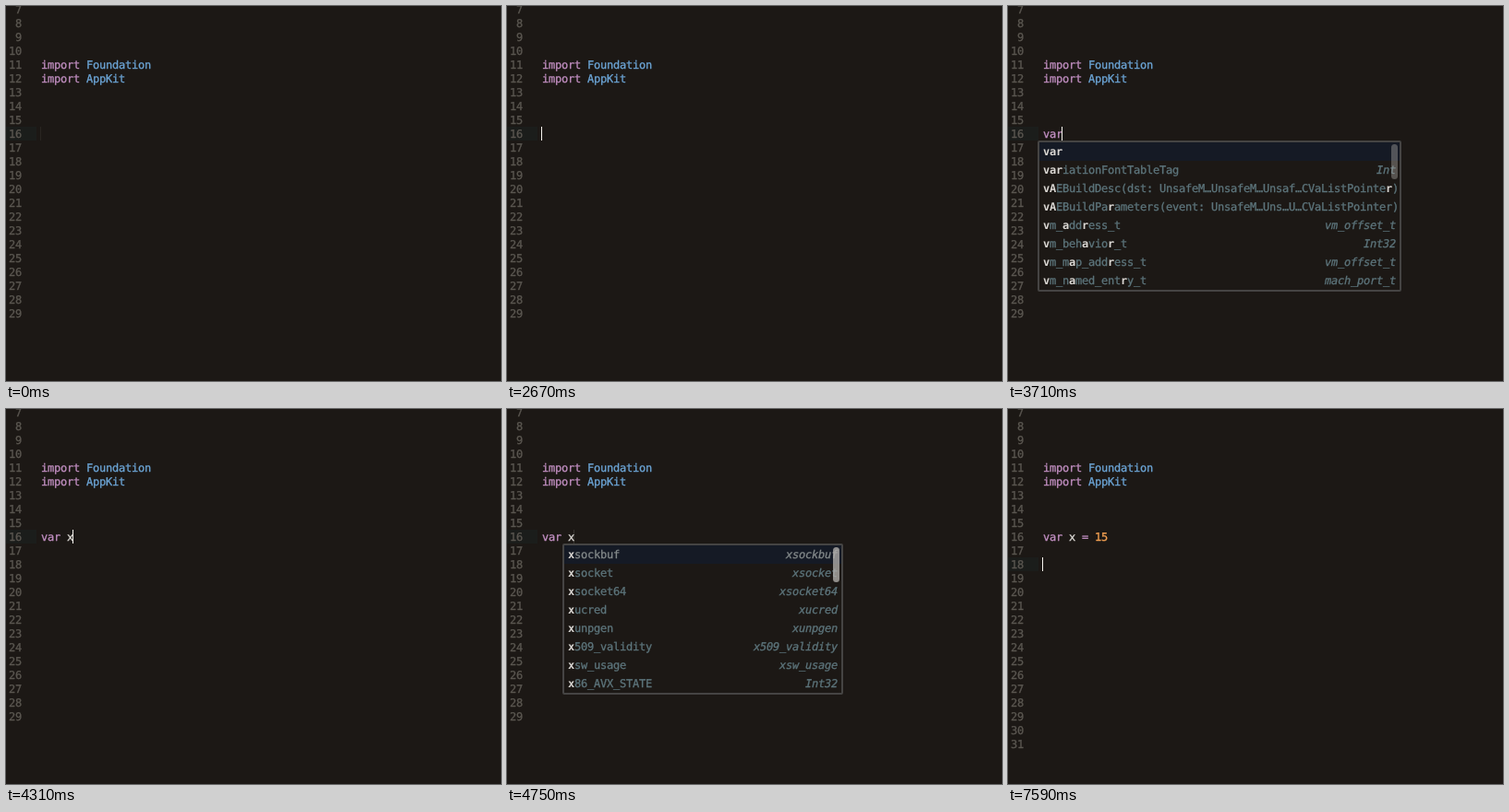
An HTML page that plays this animation: 536 by 407 pixels, repeating every 8 s.

```html
<!DOCTYPE html>
<html lang="en">
<head>
<meta charset="utf-8">
<title>Code completion</title>
<style>
  html, body { margin: 0; width: 100%; height: 100%; overflow: hidden; background: #1c1815; }
  #stage {
    position: relative; width: 536px; height: 407px; overflow: hidden; background: #1c1815;
    font: 12px/15px "DejaVu Sans Mono", monospace; letter-spacing: -.225px;
    text-rendering: geometricPrecision; -webkit-text-stroke: .3px;
    white-space: pre; color: #dedbd7;
  }
  #stage > div { position: absolute; }
  .num { left: 0; width: 17px; text-align: right; color: #5b5751; }
  .code { left: 38px; }
  #active { left: 0; width: 33px; height: 15px; background: #1b1d1b; }
  #caret { width: 1px; height: 15px; background: #f6f3ee; }
  .kw { color: #c28fc2; }
  .mod { color: #6ca5d6; }
  .lit { color: #f3a052; }
  .popup {
    top: 146px; height: 160px; border: 2px solid #454443; border-radius: 2px;
    background: #1c1815; color: #5d757c; overflow: hidden;
  }
  .row { position: relative; height: 20px; line-height: 20px; padding-left: 4px; }
  .row:first-child { background: #151a25; color: #83898a; }
  .row b { color: #dad7d3; -webkit-text-stroke: 0; }
  .row i { position: absolute; right: 4px; top: 0; }
  .bar {
    position: absolute; right: 2px; top: 2px; width: 7px; height: 38px;
    border-radius: 4px; background: rgba(178, 176, 172, .78);
  }
</style>
</head>
<body>
<div id="stage"></div>
<script>
const LOOP = 8000, CELL = 7, LINE = 15, LEFT = 38;
const stage = document.getElementById('stage');
const lineTop = n => 131 + (n - 16) * LINE;
const textTop = n => lineTop(n) + 1;
const span = (cls, text) => `<span class="${cls}">${text}</span>`;
const escape = s => s.replace(/&/g, '&amp;').replace(/</g, '&lt;');

function add(cls, html = '', top) {
  const el = document.createElement('div');
  el.className = cls;
  el.innerHTML = html;
  if (top !== undefined) el.style.top = top + 'px';
  return stage.appendChild(el);
}

function addId(id) {
  const el = add('');
  el.id = id;
  return el;
}

// Bold the letters of the query, in order, wherever they first occur.
function mark(name, query) {
  let k = 0;
  return [...name].map(c => {
    const hit = k < query.length && c.toLowerCase() === query[k];
    if (hit) k++;
    return hit ? `<b>${c}</b>` : escape(c);
  }).join('');
}

function makePopup(left, width, query, items) {
  const rows = items.map(item => {
    const [name, type = ''] = item.split('|');
    return `<div class="row">${mark(name, query)}<i>${escape(type)}</i></div>`;
  });
  const el = add('popup', rows.join('') + '<div class="bar"></div>');
  el.style.left = left + 'px';
  el.style.width = width - 4 + 'px';
  return el;
}

const active = addId('active');
const nums = [];
for (let n = 7; n <= 31; n++) nums[n] = add('num', n, textTop(n));
add('code', span('kw', 'import') + ' ' + span('mod', 'Foundation'), textTop(11));
add('code', span('kw', 'import') + ' ' + span('mod', 'AppKit'), textTop(12));
const typed = add('code', '', textTop(16));
const caret = addId('caret');

const desc = 'vAEBuildDesc(dst: UnsafeM…UnsafeM…Unsaf…CVaListPointer)';
const params = 'vAEBuildParameters(event: UnsafeM…Uns…U…CVaListPointer)';
const popups = {
  va: makePopup(32, 394, 'va', [
    desc, params, 'var', 'va_list|__darwin_va_list',
    'valloc(Int)|UnsafeMutablePointer<Void>', 'validInstancesExist|Int',
    'variationFontTableTag|Int', 'vm_address_t|vm_offset_t'
  ]),
  var: makePopup(32, 394, 'var', [
    'var', 'variationFontTableTag|Int', desc, params,
    'vm_address_t|vm_offset_t', 'vm_behavior_t|Int32',
    'vm_map_address_t|vm_offset_t', 'vm_named_entry_t|mach_port_t'
  ]),
  x: makePopup(60, 304, 'x', [
    'xsockbuf|xsockbuf', 'xsocket|xsocket', 'xsocket64|xsocket64', 'xucred|xucred',
    'xunpgen|xunpgen', 'x509_validity|x509_validity', 'xsw_usage|xsw_usage',
    'x86_AVX_STATE|Int32'
  ])
};

const text = 'var x = 15';
const colour = s => s.replace(/var|=|\d+/g, m => span(/\d/.test(m) ? 'lit' : 'kw', m));

// time, letters typed, caret opacity, popup, scrollbar opacity, caret line
const steps = [
  [0, 0, .06], [150, 0, 0], [300, 0, .04], [440, 0, .85], [590, 0, 1],
  [1030, 0, .06], [1170, 0, 0], [1470, 0, .85], [1620, 0, 1],
  [2070, 0, .06], [2220, 0, 0], [2520, 0, .85], [2670, 0, 1],
  [2820, 1, 1], [3110, 2, 1, 'va', 1], [3410, 3, 1, 'var', 1],
  [3710, 3, 1, 'var', .5], [3860, 3, .12, 'var', 0], [4010, 4, 1],
  [4310, 5, 1], [4610, 5, 1, 'x', 1], [4750, 5, .12, 'x', 1], [4900, 5, 0, 'x', 1],
  [5200, 5, .85, 'x', .5], [5350, 5, 1, 'x', 0], [5500, 6, 1],
  [5800, 7, 1], [5950, 8, 1], [6240, 9, 1], [6540, 10, 1],
  [6840, 10, .2], [6990, 10, 0],
  [7290, 10, 1, '', 0, 17], [7590, 10, 1, '', 0, 18]
];

let shown;
function show(step) {
  const [, count, glow, popup = '', bar = 0, line = 16] = step;
  const column = line === 16 ? count : 0;
  typed.innerHTML = colour(text.slice(0, count));
  caret.style.left = LEFT - 1 + column * CELL + 'px';
  caret.style.top = active.style.top = lineTop(line) + 'px';
  caret.style.opacity = glow;
  for (const n of [30, 31]) nums[n].style.display = n <= line + 13 ? '' : 'none';
  for (const key in popups) {
    popups[key].style.display = key === popup ? '' : 'none';
    popups[key].lastChild.style.opacity = bar;
  }
}

function tick() {
  const t = performance.now() % LOOP;
  const step = steps.findLast(s => s[0] <= t);
  if (step !== shown) show(shown = step);
  requestAnimationFrame(tick);
}
tick();
</script>
</body>
</html>
```
